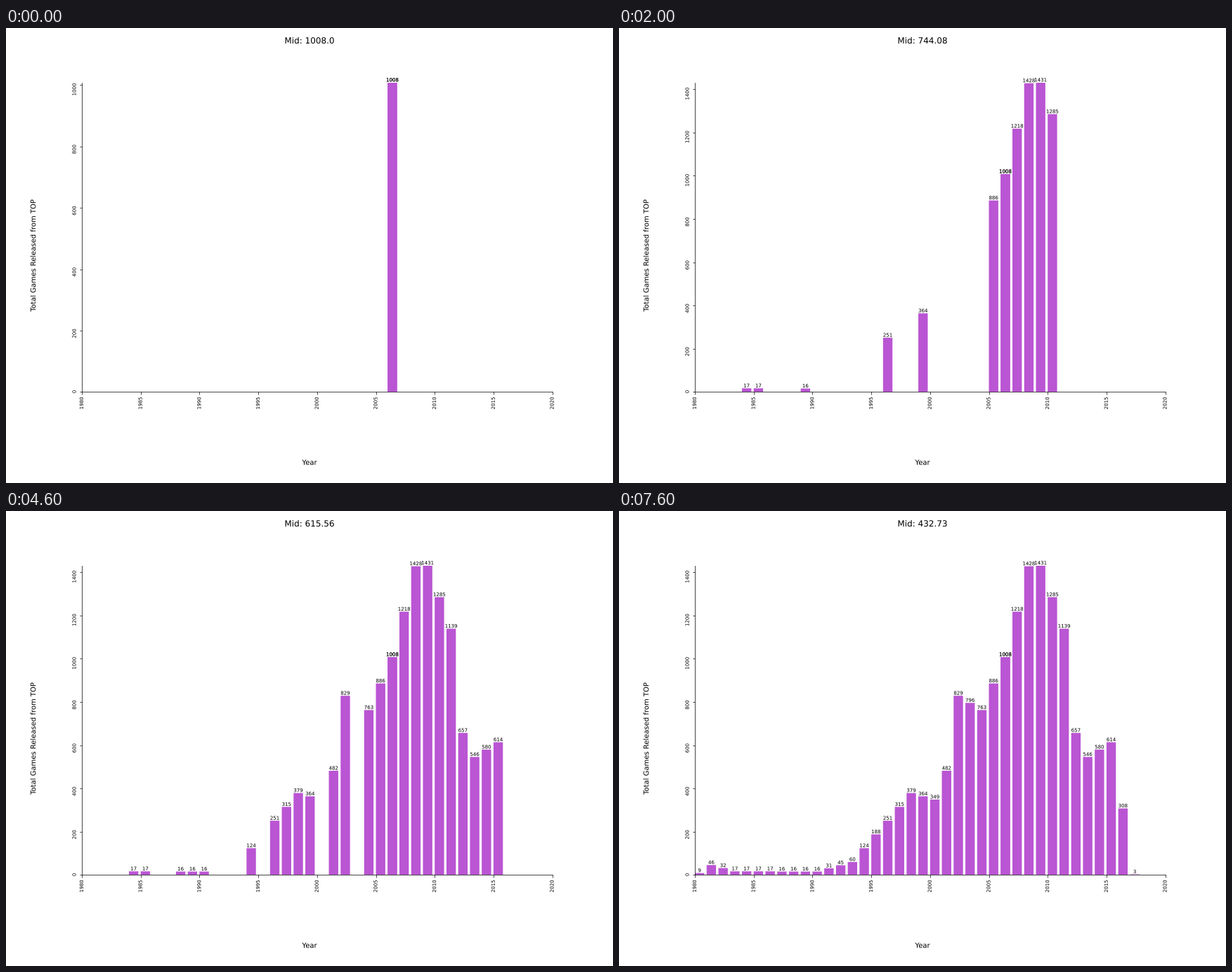
These frames come from a looping animation (864 by 648 pixels, 7800 ms). A matplotlib script:

```python
import matplotlib.pyplot as plt
import numpy as np
from matplotlib import patheffects
from matplotlib.animation import FuncAnimation

# Unhinted outline text and unsnapped bars keep sub-pixel positions.
plt.rcParams.update({
    "font.family": "DejaVu Sans",
    "text.hinting": "none",
    "axes.linewidth": 0.72,
    "xtick.major.width": 0.72,
    "ytick.major.width": 0.72,
})
SMOOTH = [patheffects.Normal()]
STEP_MS = 200

# Turning points of the yearly totals; years between are interpolated.
turns = [(1980, 9), (1981, 46), (1983, 17), (1990, 16), (1993, 60),
         (1998, 379), (2000, 349), (2001, 482), (2002, 829), (2004, 763),
         (2006, 1008), (2008, 1428), (2009, 1431), (2011, 1139),
         (2012, 657), (2013, 546), (2015, 614), (2017, 3)]

# The first years to appear; the rest spread outwards from 2005.
lead = [2006, 1985, 2008, 2009, 1996, 1989, 1984, 2005, 1999, 2007,
        2010, 2013, 2004, 1990, 1988]
late = {1991, 1995, 2000, 2003}


def arrival(year):
    delay = 12 if year in late or year > 2015 else 0
    return abs(year - 2005) + delay


rest = sorted({*range(1980, 2018), 2020} - set(lead), key=arrival)
years = lead[:1] + lead + rest  # the opening year is counted twice
values = np.rint(np.interp(years, *zip(*turns))).astype(int)

fig, ax = plt.subplots(figsize=(12, 9), dpi=72, facecolor="white")
fig.subplots_adjust(left=0.125, right=0.9, bottom=0.2, top=0.88)
title = fig.suptitle("", fontsize=12, path_effects=SMOOTH)
fig.text(0.5, 0.04, "Year", ha="center", fontsize=10, path_effects=SMOOTH)
fig.text(0.04, 0.5, "Total Games Released from TOP", va="center",
         rotation="vertical", fontsize=10, path_effects=SMOOTH)

bars = ax.bar(years, values, width=0.8, align="edge", color="mediumorchid",
              snap=False)
labels = ax.bar_label(bars, fontsize=7, path_effects=SMOOTH)

ax.spines[["top", "right"]].set_visible(False)
ax.tick_params(labelsize=7, labelrotation=90)
ax.set_xlim(1980, 2020)
ax.set_xticks(range(1980, 2021, 5))


def update(i):
    n = i + 2
    top = values[:n].max()
    ax.set_yticks(range(0, top + 1, 200))
    ax.set_ylim(0, top)
    for text in ax.get_xticklabels() + ax.get_yticklabels():
        text.set_path_effects(SMOOTH)
    for j, (bar, label) in enumerate(zip(bars, labels)):
        bar.set_visible(j < n)
        label.set_visible(j < n)
    title.set_text(f"Mid: {round(float(values[:n].mean()), 2)}")
    return [title, *bars, *labels]


anim = FuncAnimation(fig, update, frames=len(years) - 1, interval=STEP_MS,
                     repeat=True, repeat_delay=0, blit=False)
plt.show()
```
